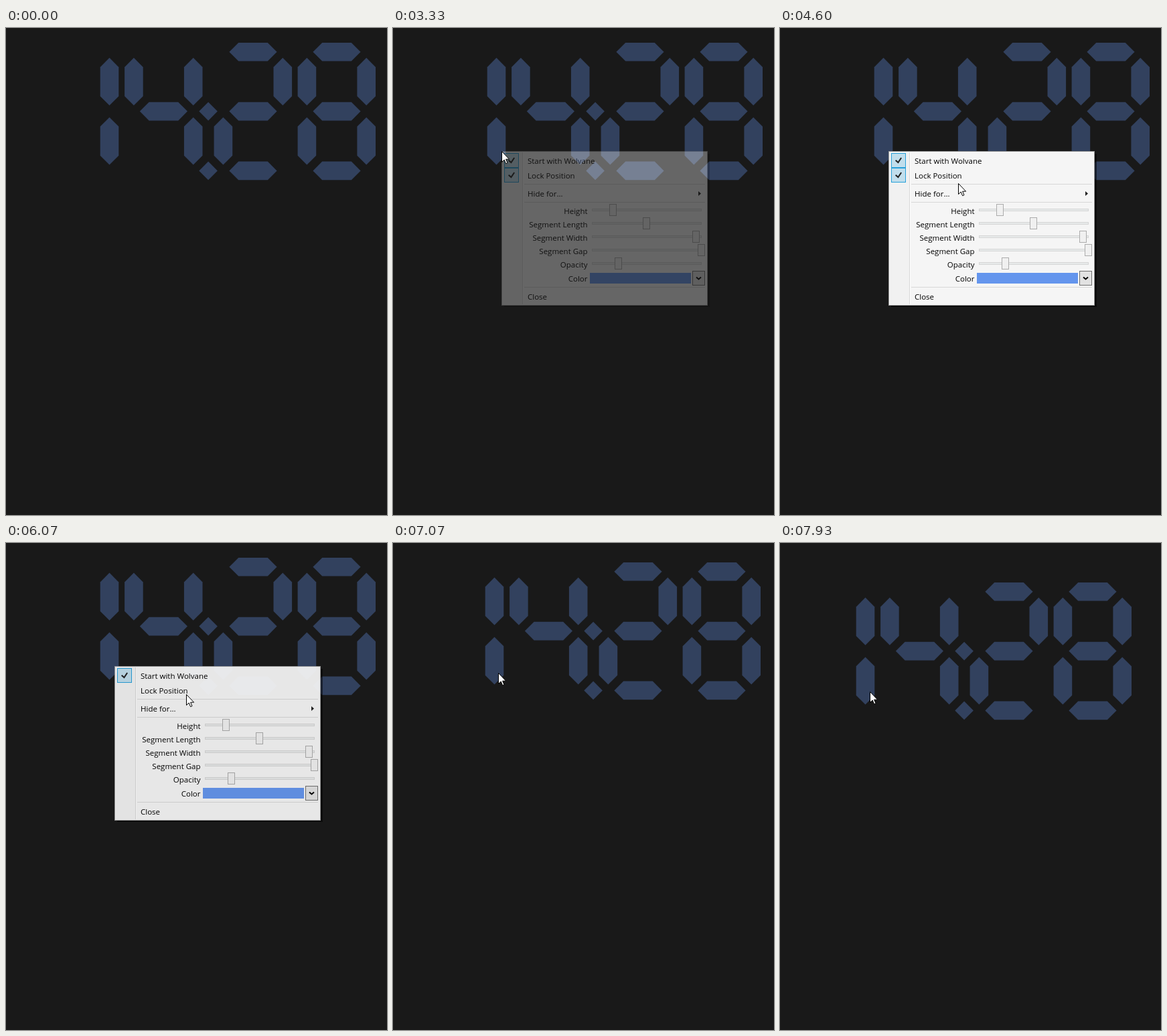
An HTML page that plays this animation: 569x728 px, repeating every 8 s.

```html
<!DOCTYPE html>
<html lang="en">
<head>
<meta charset="utf-8">
<title>Desktop clock</title>
<style>
html, body { margin: 0; width: 100%; height: 100%; overflow: hidden; background: #191919; }
svg { display: block; width: 569px; height: 728px; }
text { font: 11.5px "Open Sans", "Noto Sans", sans-serif; fill: #000; }
.clock { fill: #32415e; }
.right { text-anchor: end; }
.track { fill: #e7eaea; stroke: #d6d6d6; }
.thumb { fill: #f0f0f0; stroke: #acacac; }
.blue { fill: #26a0da3d; stroke: #26a0da; }
.glyph { fill: #212121; }

/* Timings: percent = milliseconds / 80 */
.colon, .drag, .pointer, .menu, .hover, .lock { animation: 8s step-end infinite; }
.colon { animation-name: blink; }
.drag { animation-name: drag; }
.pointer { animation-name: pointer; }
.menu { animation-name: menu; }
.hover { animation-name: hover; }
.lock { animation-name: lock; }

@keyframes blink {
  0%, 12.5%, 25%, 36.625%, 49.125%, 62.5%, 75%, 87.5%, 99.125%, 100% { visibility: visible; }
  5.875%, 19.125%, 30.875%, 43.375%, 55.875%, 68.375%, 80.875%, 94.125% { visibility: hidden; }
}
@keyframes drag {
  0% { transform: none; }
  85% { transform: translate(0, 0); animation-timing-function: steps(4, end); }
  88.375% { transform: translate(-3px, 7px); }
  89.125% { transform: translate(-11px, 22px); }
  90% { transform: translate(-20px, 40px); }
  90.875% { transform: translate(-25px, 51px); }
  94.125% { transform: translate(-25px, 51px); animation-timing-function: steps(5, end); }
  98.375%, 100% { transform: translate(-27px, 37px); }
}
@keyframes pointer {
  0% { transform: translate(-40px, 240px); }
  24.125% { transform: translate(33px, 231px); animation-timing-function: steps(2, end); }
  25.875% { transform: translate(92px, 214px); animation-timing-function: steps(3, end); }
  28.375% { transform: translate(151px, 196px); animation-timing-function: steps(4, end); }
  31.625% { transform: translate(162px, 184px); }
  48.25% { transform: translate(162px, 184px); animation-timing-function: steps(5, end); }
  52.5% { transform: translate(243px, 229px); animation-timing-function: steps(2, end); }
  54.125% { transform: translate(261px, 239px); }
  55% { transform: translate(261px, 239px); animation-timing-function: steps(2, end); }
  57.5% { transform: translate(266px, 232px); animation-timing-function: steps(2, end); }
  59.125% { transform: translate(269px, 226px); }
  75.875% { transform: translate(269px, 226px); animation-timing-function: steps(5, end); }
  80% { transform: translate(207px, 204px); animation-timing-function: steps(6, end); }
  85% { transform: translate(160px, 187px); }
  94.125% { transform: translate(160px, 187px); animation-timing-function: steps(5, end); }
  98.375%, 100% { transform: translate(161px, 185px); }
}
@keyframes menu {
  0% { opacity: 0; }
  41.625% { opacity: .35; }
  42.5% { opacity: .8; }
  43.375% { opacity: 1; }
  75.875% { opacity: .94; }
  76.625% { opacity: .5; }
  77.5% { opacity: .12; }
  78.375%, 100% { opacity: 0; }
}
@keyframes hover {
  0% { visibility: hidden; transform: none; }
  50% { visibility: visible; transform: none; }
  51.625% { visibility: visible; transform: translateY(22px); }
  53.375% { visibility: visible; transform: translateY(49px); }
  56.625% { visibility: hidden; transform: translateY(22px); }
  58.375% { visibility: visible; transform: translateY(22px); }
  75%, 100% { visibility: hidden; transform: none; }
}
@keyframes lock {
  0% { visibility: visible; }
  75%, 100% { visibility: hidden; }
}
</style>
</head>
<body>
<svg viewBox="0 0 569 728">
  <defs>
    <path id="v" d="M0-35.6 13.8-21.8V21.8L0 35.6-13.8 21.8V-21.8Z"/>
    <path id="h" d="M-35.6 0-21.8-13.8H21.8L35.6 0 21.8 13.8H-21.8Z"/>
    <path id="dot" d="M0-13.8 13.8 0 0 13.8-13.8 0Z"/>
    <g id="check">
      <rect class="blue" x="166.5" y="187.5" width="21" height="21"/>
      <path class="glyph" transform="translate(172 193.4)" d="M10 1.2 4.7 9.1H4.5L0 5.2 1.3 3.5 4.3 6.1 8.3 0Z"/>
    </g>
    <rect id="track" class="track" x="297.5" y="-1.5" width="163" height="3"/>
    <rect id="thumb" class="thumb" x="-5" y="-8.5" width="10" height="17"/>
    <path id="rule" d="M196 .5H466" stroke="#d7d7d7"/>
  </defs>

  <g class="clock drag">
    <use href="#v" x="154.5" y="80.2"/><use href="#v" x="154.5" y="169"/>

    <use href="#v" x="190.9" y="80.2"/><use href="#h" x="235.4" y="124.6"/>
    <use href="#v" x="279.7" y="80.2"/><use href="#v" x="279.7" y="169"/>

    <g class="colon"><use href="#dot" x="302.1" y="124.6"/><use href="#dot" x="302.1" y="213.4"/></g>

    <use href="#h" x="369" y="35.8"/><use href="#h" x="369" y="124.6"/><use href="#h" x="369" y="213.4"/>
    <use href="#v" x="413.3" y="80.2"/><use href="#v" x="324.4" y="169"/>

    <use href="#h" x="494" y="35.8"/><use href="#h" x="494" y="124.6"/><use href="#h" x="494" y="213.4"/>
    <use href="#v" x="449.4" y="80.2"/><use href="#v" x="449.4" y="169"/>
    <use href="#v" x="538.2" y="80.2"/><use href="#v" x="538.2" y="169"/>
  </g>

  <g class="menu">
    <path d="M166 415.5H471.5V188" fill="none" stroke="#0008" stroke-width="3"/>
    <rect x="162.5" y="184.5" width="307" height="230" fill="#f5f5f5" stroke="#999"/>
    <rect x="164" y="186" width="29" height="227" fill="#f1f1f1"/>
    <path d="M193.5 186V413" stroke="#d7d7d7"/>
    <path d="M194.5 186V413" stroke="#fff"/>
    <use href="#rule" y="233"/><use href="#rule" y="260"/><use href="#rule" y="387"/>

    <rect class="hover blue" x="166.5" y="187.5" width="299" height="21"/>
    <use href="#check"/>
    <g class="lock"><use href="#check" y="22"/></g>

    <text x="201" y="203">Start with Wolvane</text>
    <text x="201" y="225">Lock Position</text>
    <text x="201" y="252">Hide for...</text>
    <path class="glyph" d="M456 244 460 247.5 456 251Z"/>

    <g class="right">
      <text x="290.5" y="278">Height</text>
      <text x="290.5" y="298">Segment Length</text>
      <text x="290.5" y="318">Segment Width</text>
      <text x="290.5" y="338">Segment Gap</text>
      <text x="290.5" y="358">Opacity</text>
      <text x="290.5" y="379">Color</text>
    </g>
    <use href="#track" y="272"/><use href="#thumb" x="328.5" y="272"/>
    <use href="#track" y="292"/><use href="#thumb" x="378.5" y="292"/>
    <use href="#track" y="312"/><use href="#thumb" x="452.5" y="312"/>
    <use href="#track" y="332"/><use href="#thumb" x="460.5" y="332"/>
    <use href="#track" y="352"/><use href="#thumb" x="336.5" y="352"/>

    <rect x="294" y="366" width="151" height="16" fill="#6495ed"/>
    <rect x="447.5" y="363.5" width="18" height="21" fill="#e2e2e2" stroke="#707070"/>
    <path d="M453 372.5 456.5 375.5 460 372.5" fill="none" stroke="#000" stroke-width="2"/>
    <text x="201" y="406">Close</text>
  </g>

  <g class="drag">
    <path class="pointer" fill="#fff" stroke="#000" d="M.5.5V16.5L4.2 13 6.6 18.7 9 17.7 6.6 12.2H11.6Z"/>
  </g>
</svg>
</body>
</html>
```
